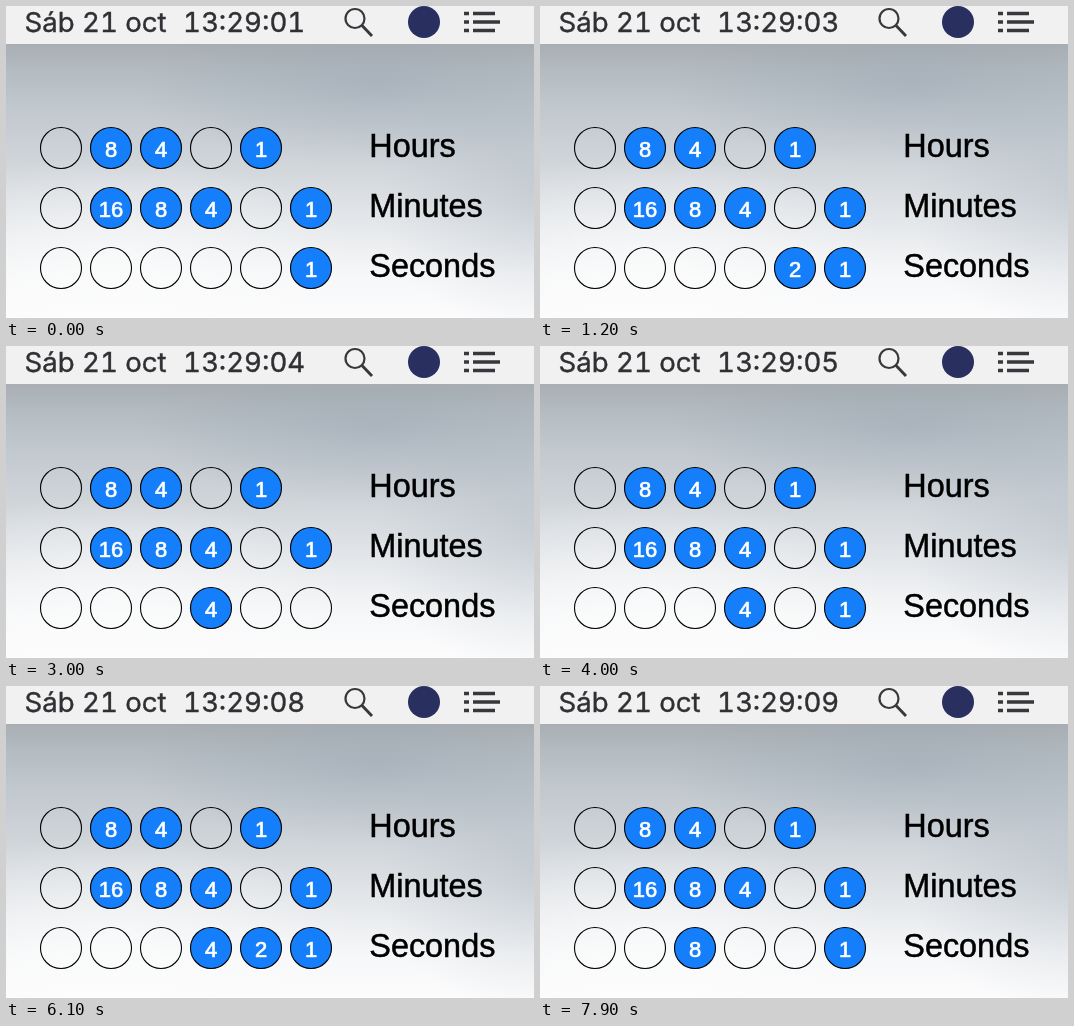
Write an HTML page that moves like this. It is 528 px wide and 312 px high and loops after 8 s.

```html
<!DOCTYPE html>
<html lang="es">
<head>
<meta charset="utf-8">
<title>Binary clock</title>
<style>
  html, body { margin: 0; width: 100%; height: 100%; overflow: hidden; }
  svg { display: block; width: 528px; height: 312px; }
  .menu { font: 27.6px Inter, Roboto, sans-serif; font-feature-settings: "tnum"; fill: #303034; stroke: #303034; stroke-width: .4; white-space: pre; }
  .label { font: 32.4px "Liberation Sans", Arial, sans-serif; fill: #000; stroke: #000; stroke-width: .5; }
  .bit { font: 22px "Liberation Sans", Arial, sans-serif; fill: #fff; stroke: #fff; stroke-width: .7; text-anchor: middle; }
  .icon { fill: none; stroke: #38383c; }
</style>
</head>
<body>
<svg viewBox="0 0 528 312">
  <defs>
    <linearGradient id="sky" x1="0" y1="0" x2="0" y2="1">
      <stop offset=".12" stop-color="#a8aeb3"/>
      <stop offset=".2" stop-color="#b3bac0"/>
      <stop offset=".32" stop-color="#c0c7cd"/>
      <stop offset=".5" stop-color="#d0d5da"/>
      <stop offset=".7" stop-color="#e5e8eb"/>
      <stop offset=".86" stop-color="#f6f7f8"/>
      <stop offset="1" stop-color="#fcfcfd"/>
    </linearGradient>
    <radialGradient id="light">
      <stop offset="0" stop-color="#fff" stop-opacity=".55"/>
      <stop offset="1" stop-color="#fff" stop-opacity="0"/>
    </radialGradient>
    <radialGradient id="shade">
      <stop offset="0" stop-color="#8f9dab" stop-opacity=".45"/>
      <stop offset="1" stop-color="#8f9dab" stop-opacity="0"/>
    </radialGradient>
  </defs>
  <rect width="528" height="312" fill="url(#sky)"/>
  <ellipse cx="370" cy="80" rx="240" ry="80" fill="url(#shade)" opacity=".75"/>
  <ellipse cx="540" cy="190" rx="170" ry="140" fill="url(#shade)" opacity=".6"/>
  <ellipse cx="110" cy="250" rx="240" ry="100" fill="url(#light)"/>

  <rect width="528" height="38" fill="#f1f1f2"/>
  <rect y="38" width="528" height="1" fill="#a9adb1"/>
  <text class="menu" x="18.5" y="26">Sáb 21 oct</text>
  <text class="menu" id="clock" x="177" y="26"></text>
  <g class="icon">
    <circle cx="349" cy="12.5" r="9.5" stroke-width="2.2"/>
    <path d="M356 19.5L366 30" stroke-width="2.9"/>
    <path d="M458 7.5h5M467 7.5h22M458 16h5M467 16h27M458 24.5h5M467 24.5h22" stroke-width="3.4"/>
  </g>
  <circle cx="418" cy="16" r="16" fill="#29305f"/>

  <g id="rows"></g>
</svg>
<script>
const LOOP = 8000;
const rowsGroup = document.getElementById("rows");
const clock = document.getElementById("clock");

function add(tag, attrs, text = "") {
  const node = document.createElementNS("http://www.w3.org/2000/svg", tag);
  for (const name in attrs) node.setAttribute(name, attrs[name]);
  node.textContent = text;
  rowsGroup.append(node);
  return node;
}

function makeRow(label, bitCount, y) {
  add("text", { class: "label", x: 363.3, y: y + 9 }, label);
  const bits = Array.from({ length: bitCount }, (_, i) => {
    const x = 55 + 50 * i;
    const value = 2 ** (bitCount - 1 - i);
    return {
      value,
      disc: add("circle", { cx: x, cy: y, r: 20.5, stroke: "#000", "stroke-width": 1.1 }),
      digit: add("text", { class: "bit", x, y: y + 9 }, value)
    };
  });
  return number => bits.forEach(({ value, disc, digit }) => {
    const on = (number & value) !== 0;
    disc.setAttribute("fill", on ? "#157efb" : "none");
    digit.setAttribute("visibility", on ? "visible" : "hidden");
  });
}

const showHours = makeRow("Hours", 5, 142);
const showMinutes = makeRow("Minutes", 6, 202);
const showSeconds = makeRow("Seconds", 6, 262);
showHours(13);
showMinutes(29);

// The menu clock ticks first; the discs follow a tenth of a second later.
const secondAt = (time, delay) => 2 + Math.floor((time - delay) / 1000);

function draw(time) {
  clock.textContent = "13:29:" + String(secondAt(time, 100)).padStart(2, "0");
  showSeconds(secondAt(time, 200));
}

const start = performance.now();
function tick() {
  draw((performance.now() - start) % LOOP);
  requestAnimationFrame(tick);
}
tick();
</script>
</body>
</html>
```
